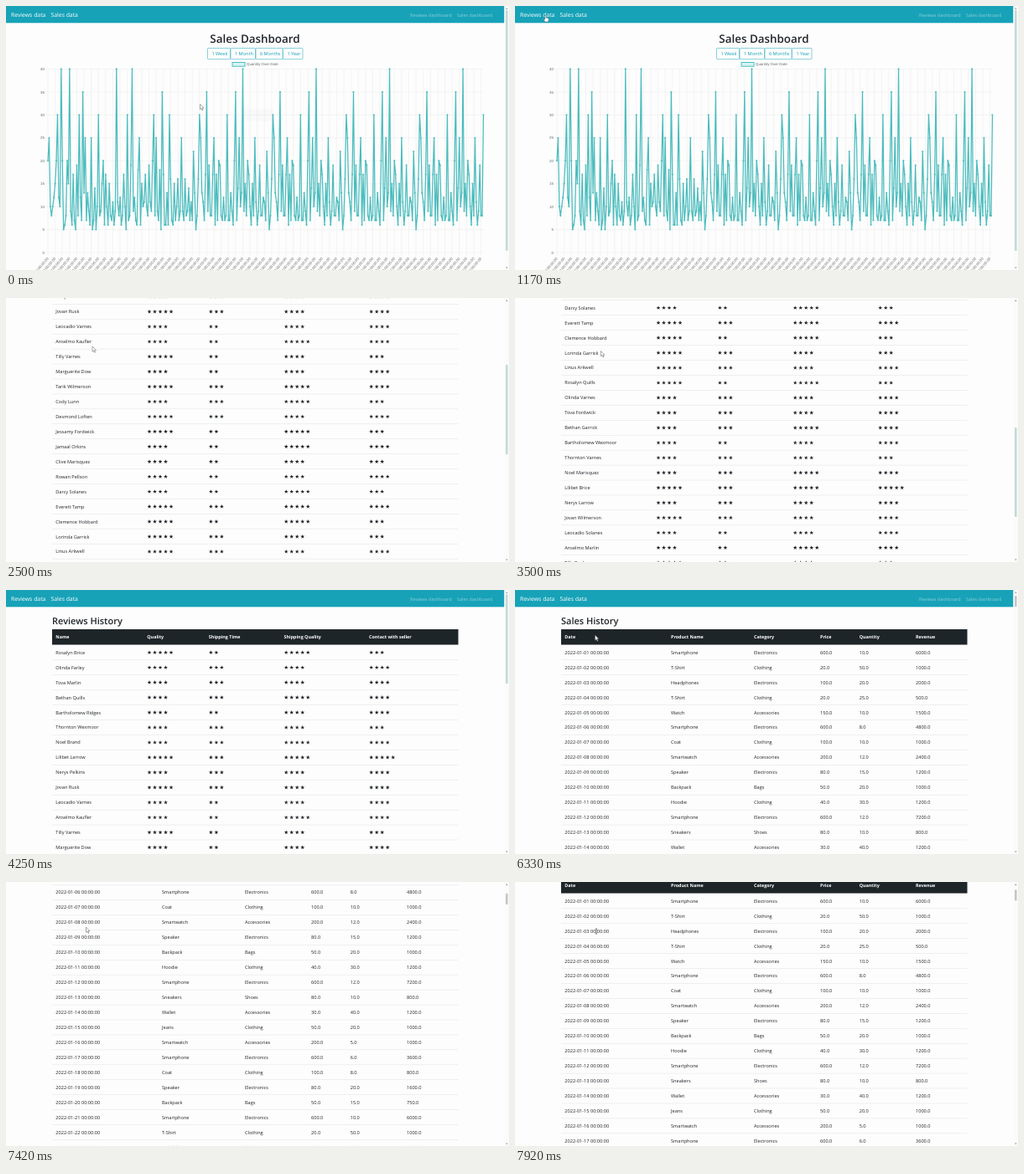
An HTML page that plays this animation: 600 px wide and 316 px high, repeating every 8 s.

```html
<!DOCTYPE html>
<html lang="en">
<head>
<meta charset="utf-8">
<title>Sales dashboard</title>
<style>
  html, body { margin: 0; width: 100%; height: 100%; overflow: hidden; background: #fdfdfd; }
  svg { display: block; width: 100vw; height: 100vh; }
  text { font-family: "Open Sans", "Noto Sans", sans-serif; font-size: 5.6px; fill: #212529; text-rendering: geometricPrecision; white-space: pre; }
  .brand { font-size: 6.85px; fill: #fff; }
  .link { font-size: 5.5px; fill: #fff; fill-opacity: .5; }
  .title { font-size: 13.4px; font-weight: 600; text-anchor: middle; }
  .heading { font-size: 11px; font-weight: 600; }
  .th { font-size: 5.4px; font-weight: 700; fill: #fff; }
  .btn { fill: #17a2b8; }
  .axis { font-family: "Liberation Sans", Arial, sans-serif; font-size: 4.4px; fill: #666; }
  .end { text-anchor: end; }
</style>
</head>
<body>
<svg id="stage" viewBox="0 0 600 316" preserveAspectRatio="none"></svg>
<script>
const LOOP = 8000, ROW = 17.95;
const stage = document.getElementById("stage");

function add(parent, tag, attrs = {}, content) {
  const node = document.createElementNS("http://www.w3.org/2000/svg", tag);
  for (const key in attrs) node.setAttribute(key, attrs[key]);
  if (content !== undefined) node.textContent = content;
  parent.appendChild(node);
  return node;
}
const text = (parent, x, y, content, cls = "") => add(parent, "text", { x, y, class: cls }, content);
const rect = (parent, x, y, width, height, fill, extra) => add(parent, "rect", { x, y, width, height, fill, ...extra });
const path = (parent, d, attrs) => add(parent, "path", { d, fill: "none", ...attrs });
const times = (count, make) => Array.from({ length: count }, (_, i) => make(i));

function makePage() {
  const page = add(stage, "g");
  rect(page, 0, 0, 594.5, 20.3, "#17a2b8");
  text(page, 6, 13.2, "Reviews data", "brand");
  text(page, 53.5, 13.2, "Sales data", "brand");
  text(page, 482, 12.7, "Reviews dashboard", "link");
  text(page, 538, 12.7, "Sales dashboard", "link");
  return page;
}

function starPath(cx, cy) {
  const points = times(10, i => {
    const r = i % 2 ? 1.05 : 2.6, a = i * Math.PI / 5 - Math.PI / 2;
    return (cx + r * Math.cos(a)).toFixed(2) + " " + (cy + r * Math.sin(a)).toFixed(2);
  });
  return "M" + points.join("L") + "Z";
}

function makeTable(title, columns, rows) {
  const page = makePage(), xs = Object.values(columns);
  text(page, 55, 41.3, title, "heading");
  rect(page, 55, 47, 484.5, 18.5, "#1e2529");
  Object.keys(columns).forEach((name, i) => text(page, xs[i], 58.3, name, "th"));
  let stars = "";
  rows.forEach((row, r) => {
    const cy = 74.6 + r * ROW;
    rect(page, 55, cy + 8.8, 484.5, .45, "#d9dde1");
    row.forEach((cell, c) => {
      if (typeof cell === "string") text(page, xs[c], cy + 2.1, cell);
      else for (let s = 0; s < cell; s++) stars += starPath(xs[c] + 2.7 + s * 6.5, cy + .2);
    });
  });
  path(page, stars, { fill: "#212529" });
  return page;
}

// Sales rows: product and quantity per day
const products = {
  Smartphone: ["Electronics", 600], "T-Shirt": ["Clothing", 20], Headphones: ["Electronics", 100],
  Watch: ["Accessories", 150], Coat: ["Clothing", 100], Smartwatch: ["Accessories", 200],
  Speaker: ["Electronics", 80], Backpack: ["Bags", 50], Hoodie: ["Clothing", 40],
  Sneakers: ["Shoes", 80], Wallet: ["Accessories", 30], Jeans: ["Clothing", 50]
};
const orders = [
  ["Smartphone", 10], ["T-Shirt", 50], ["Headphones", 20], ["T-Shirt", 25], ["Watch", 10],
  ["Smartphone", 8], ["Coat", 10], ["Smartwatch", 12], ["Speaker", 15], ["Backpack", 20],
  ["Hoodie", 30], ["Smartphone", 12], ["Sneakers", 10], ["Wallet", 40], ["Jeans", 20],
  ["Smartwatch", 5], ["Smartphone", 6], ["Coat", 8], ["Speaker", 20], ["Backpack", 15]
];
const stamp = day => new Date(Date.UTC(2022, 0, 1 + day)).toISOString().slice(0, 10) + " 00:00:00";
const saleRows = times(25, day => {
  const [name, count] = orders[day % orders.length];
  const [category, price] = products[name];
  return [stamp(day), name, category, ...[price, count, price * count].map(n => n.toFixed(1))];
});

// Review rows: name and the digits of its four ratings
const reviews = [
  ["Rosalyn Brice", 5253], ["Olinda Farley", 4344], ["Tova Marlin", 4344], ["Bethan Quills", 4354],
  ["Bartholomew Ridges", 4244], ["Thornton Wexmoor", 4343], ["Noel Brand", 4354], ["Lilibet Larrow", 5355],
  ["Nerys Pelkins", 4344], ["Jovan Rusk", 5344], ["Leocadio Varnes", 4244], ["Anselmo Kaufler", 4254],
  ["Tilly Varnes", 5243], ["Marguerite Dow", 4244], ["Tarik Wilmerson", 5354], ["Cody Lunn", 4353],
  ["Desmond Loften", 5344], ["Jessamy Fordwick", 5253], ["Jamaal Orkins", 4254], ["Clive Marisquez", 4243],
  ["Rowan Pellson", 4244], ["Darcy Solanes", 4253], ["Everett Tamp", 5354], ["Clemence Hobbard", 5253],
  ["Lorinda Garrick", 5343], ["Linus Arkwell", 5344]
];
const reviewRows = times(46, i => {
  const [name, ratings] = reviews[i % 26];
  const surname = reviews[i < 26 ? i : (i * 7 + 3) % 26][0].split(" ")[1];
  return [name.split(" ")[0] + " " + surname, ...String(ratings).split("").map(Number)];
});

// Chart: the first orders, then tall days among small noise, repeating every two months
const CYCLE_START = 119, CYCLE = 61, DAYS = 363;
const tallDays = {
  18: 40, 26: 30, 29: 35, 31: 25, 36: 25, 42: 30, 46: 20, 57: 40, 66: 30, 70: 40, 76: 25,
  88: 30, 90: 25, 95: 35, 101: 30, 111: 25, 362: 30
};
const tallCycleDays = { 2: 22, 7: 30, 8: 25, 13: 35, 19: 25, 23: 20, 30: 30, 37: 35, 40: 25, 43: 40, 47: 20, 53: 25 };
const noise = i => Math.abs(Math.sin(i * 127.1) * 43758.5) % 1;
const smallDay = i => Math.round(i % 3 ? 5 + 6 * noise(i) : 11 + 9 * noise(i));

function quantity(day) {
  if (day < 18) return orders[day + 2][1];
  const phase = (day - CYCLE_START) % CYCLE;
  const tall = tallDays[day] || tallCycleDays[phase];
  return tall || smallDay(phase < 0 ? day : phase);
}

function makeDashboard() {
  const page = makePage();
  const px = day => 50 + day * 1.435, py = v => 295 - v * 5.488;
  text(page, 297, 44.4, "Sales Dashboard", "title");
  Object.entries({ "1 Week": 240.5, "1 Month": 268, "6 Months": 298, "1 Year": 330.5 }).forEach(([label, x], i, all) => {
    const right = i < 3 ? all[i + 1][1] - .5 : 354;
    rect(page, x, 50.5, right - x, 13.2, "#fdfdfd", { rx: .9, stroke: "#17a2b8", "stroke-width": .5 });
    text(page, x + 4.9, 59.3, label, "btn");
  });
  rect(page, 270, 67.5, 15, 4.7, "#4bc0c0", { "fill-opacity": .2, stroke: "#4bc0c0", "stroke-width": 1 });
  text(page, 287, 71.2, "Quantity Over Date", "axis");

  let grid = "";
  for (let v = 0; v <= 40; v += 5) {
    grid += `M46.5 ${py(v)}H${px(DAYS - 1)}`;
    text(page, 46, py(v) + 1.6, v, "axis end");
  }
  for (let day = 0; day < DAYS; day += 6) {
    grid += `M${px(day)} ${py(40)}V298.5`;
    add(page, "text", { class: "axis end", transform: `translate(${px(day) + 1} 302.5) rotate(-50)` }, stamp(day + 2) + ".00");
  }
  path(page, grid, { stroke: "#e6e6e6", "stroke-width": .4 });

  const points = times(DAYS, day => px(day).toFixed(2) + " " + py(quantity(day)).toFixed(2));
  path(page, "M" + points.join("L"), { stroke: "#4bbcbd", "stroke-width": 1.25, "stroke-linejoin": "round" });
  path(page, points.map(p => `M${p}h.01`).join(""), { stroke: "#4bbcbd", "stroke-width": 2.3, "stroke-linecap": "round", "stroke-opacity": .75 });
  return page;
}

const pages = {
  dashboard: makeDashboard(),
  reviews: makeTable("Reviews History",
    { Name: 59.3, Quality: 168.3, "Shipping Time": 241.7, "Shipping Quality": 331.5, "Contact with seller": 433 }, reviewRows),
  sales: makeTable("Sales History",
    { Date: 59.3, "Product Name": 186, Category: 285, Price: 364, Quantity: 410.7, Revenue: 478 }, saleRows)
};
const ghost = rect(stage, 282, 123, 38, 15, "#000", { rx: 2, "fill-opacity": .015 });

// Scrollbar
rect(stage, 594.5, 0, 5.5, 316, "#fbfbfb");
path(stage, "M596 4L597.3 2L598.6 4ZM596 312.5L597.3 314.5L598.6 312.5Z", { fill: "#a5a5a5" });
const thumb = rect(stage, 596, 5, 2.6, 288, "#c3dbd7", { rx: .6 });
const bars = {
  dashboard: { top: 5, size: 288, ratio: 0, fill: "#c3dbd7" },
  reviews: { top: 5, size: 107, ratio: .341, fill: "#c3dbd7" },
  sales: { top: 7, size: 13, ratio: .045, fill: "#c6c6c6" }
};

// Pointers, with the hot spot at the origin
const pointerStyle = { fill: "#fff", stroke: "#555", "stroke-width": .5, "stroke-linejoin": "round" };
const pointers = {
  arrow: path(stage, "M0 0V6.2L1.5 5L2.5 7.3L3.5 6.8L2.5 4.6H4.5Z", pointerStyle),
  hand: path(stage, "M-.7 .4Q0 -.6 .7 .4V3L3.2 3.7Q4 4 3.8 5L3 8H-.6L-2.3 5.2Q-2.2 4.2 -.7 5Z", pointerStyle),
  beam: path(stage, "M-1.2 -3H1.2M0 -3V3M-1.2 3H1.2", { stroke: "#555", "stroke-width": .7 })
};

// Moves are [start, end, ...values to reach]; between moves everything rests
const scrollMoves = {
  dashboard: [[0, 0, 0]],
  reviews: [[0, 0, 0], [2170, 2460, 220], [3170, 3500, 440], [3750, 4200, 0]],
  sales: [[0, 0, 0], [6670, 6900, 110], [7250, 7500, 165], [7750, 7920, 52]]
};
const pointerMoves = [
  [0, 0, 231.5, 117.5], [0, 670, 36.5, 11], [1840, 2250, 103, 58], [2840, 3080, 102.5, 63.5],
  [3750, 4200, 103, 51], [4500, 4830, 70, 10.5], [5170, 5170, 82.5, 25.5], [6000, 6170, 95.5, 54],
  [7750, 7830, 97, 59]
];
// Pointer kind from each time on
const pointerKinds = [
  [0, "arrow"], [1000, "hand"], [1840, "arrow"], [4170, ""], [4540, "arrow"], [4750, "hand"],
  [5170, ""], [5920, "arrow"], [6000, ""], [6170, "arrow"], [7830, "beam"]
];

const ease = u => u * u * (3 - 2 * u);
function sample(moves, t) {
  let values = moves[0].slice(2);
  for (const [start, end, ...goal] of moves) {
    if (t < start) break;
    const u = t >= end ? 1 : ease((t - start) / (end - start));
    values = values.map((v, i) => v + (goal[i] - v) * u);
  }
  return values;
}
const show = (node, on) => node.setAttribute("display", on ? "inline" : "none");

function render(t) {
  const current = t < 1420 ? "dashboard" : t < 5170 ? "reviews" : "sales";
  const [scroll] = sample(scrollMoves[current], t);
  for (const name in pages) show(pages[name], name === current);
  pages[current].setAttribute("transform", `translate(0 ${-scroll})`);
  show(ghost, t < 250);

  const bar = bars[current];
  thumb.setAttribute("y", bar.top + scroll * bar.ratio);
  thumb.setAttribute("height", bar.size);
  thumb.setAttribute("fill", bar.fill);

  const [x, y] = sample(pointerMoves, t);
  const kind = pointerKinds.filter(key => key[0] <= t).pop()[1];
  for (const name in pointers) {
    show(pointers[name], name === kind);
    pointers[name].setAttribute("transform", `translate(${x} ${y})`);
  }
}

const start = performance.now();
function tick() {
  render(Math.max(0, performance.now() - start) % LOOP);
  requestAnimationFrame(tick);
}
render(0);
requestAnimationFrame(tick);
</script>
</body>
</html>
```
